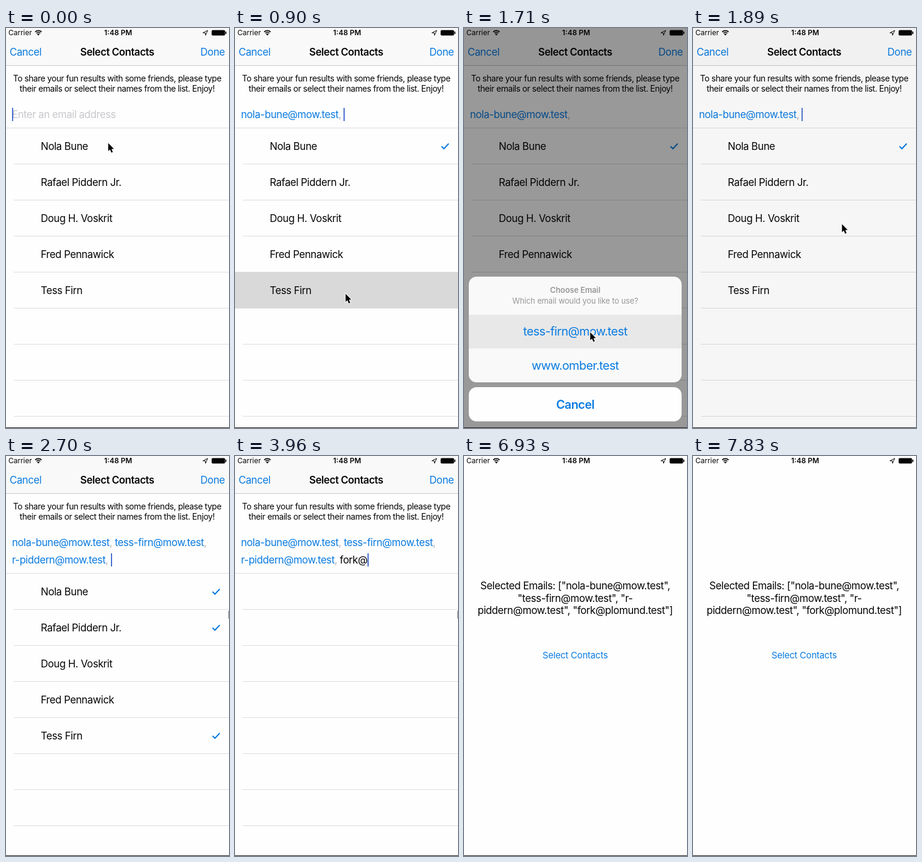
An HTML page with a canvas that plays this animation: 372 by 666 pixels, repeating every 7920 ms.

```html
<!DOCTYPE html>
<html lang="en">
<head>
<meta charset="utf-8">
<title>Select Contacts</title>
<style>
html, body { margin: 0; width: 372px; height: 666px; overflow: hidden; background: #fefefe; }
canvas { display: block; }
</style>
</head>
<body>
<canvas id="stage" width="372" height="666"></canvas>
<script>
const W = 372, H = 666, LOOP = 7920, STEP = 90, MID = 185.5;
const ctx = document.getElementById('stage').getContext('2d');
const PAPER = '#fefefe', BAR = '#f9f9f9', INK = '#050505', BLUE = '#0a7be0';
const LINE = '#dcdce4', PRESSED = '#d9d9d9';

// pressed: [from, to], checked: moment the tick appears
const contacts = [
  { name: 'Nola Bune', email: 'nola-bune@mow.test', pressed: [360, 450], checked: 450 },
  { name: 'Rafael Piddern Jr.', email: 'r-piddern@mow.test', pressed: [2160, 2250], checked: 2250 },
  { name: 'Doug H. Voskrit' },
  { name: 'Fred Pennawick' },
  { name: 'Tess Firn', email: 'tess-firn@mow.test', pressed: [900, 1300], checked: 1980 }
];
const [nola, rafael, , , tess] = contacts;
const TYPED = 'fork@plomund.test';
const TYPE_AT = 3060, COMMIT_AT = 5960, DONE_AT = 6440;

// pointer stops: time, x, y
const stops = [
  [0, 170, 191], [540, 170, 191], [860, 184, 442], [1200, 184, 442],
  [1560, 210, 506], [1730, 210, 506], [1890, 248, 326], [2070, 252, 262],
  [2340, 252, 262], [2700, 371, 257], [5900, 371, 257], [6300, 344, 42],
  [6600, 344, 42], [7100, 382, 60]
];

const clamp = v => Math.max(0, Math.min(1, v));
const ramp = (t, a, b) => clamp((t - a) / (b - a));
const smooth = x => x * x * (3 - 2 * x);
const mix = (a, b, p) => a + (b - a) * p;
const within = (t, span) => !!span && t >= span[0] && t < span[1];

function rect(x, y, w, h, color) {
  ctx.fillStyle = color;
  ctx.fillRect(x, y, w, h);
}

function text(str, x, y, size, { color = INK, align = 'left', weight = 400, gap = 0 } = {}) {
  ctx.font = `${weight} ${size}px Inter, "Liberation Sans", sans-serif`;
  ctx.letterSpacing = gap + 'px';
  ctx.textAlign = align;
  ctx.fillStyle = color;
  ctx.fillText(str, x, y + size * 0.36);
  return x + ctx.measureText(str).width;
}

function path(points, close) {
  ctx.beginPath();
  points.forEach(([x, y], i) => i ? ctx.lineTo(x, y) : ctx.moveTo(x, y));
  if (close) ctx.closePath();
}

function panel(x, y, w, h, color) {
  ctx.beginPath();
  ctx.roundRect(x, y, w, h, 13);
  ctx.fillStyle = color;
  ctx.fill();
}

function statusBar() {
  text('Carrier', 4, 8, 12);
  ctx.strokeStyle = ctx.fillStyle = INK;
  ctx.lineWidth = 1.7;
  for (const r of [4.6, 7.6]) {
    ctx.beginPath();
    ctx.arc(54, 12, r, -Math.PI * 0.75, -Math.PI * 0.25);
    ctx.stroke();
  }
  ctx.beginPath();
  ctx.moveTo(54, 12.5);
  ctx.arc(54, 12.5, 3, -Math.PI * 0.75, -Math.PI * 0.25);
  ctx.fill();
  text('1:48 PM', 187, 8, 12, { align: 'center', weight: 600 });
  path([[328.5, 8], [336.5, 4], [332.8, 12.2], [332.5, 8.2]], true);
  ctx.lineWidth = 1;
  ctx.stroke();
  ctx.beginPath();
  ctx.roundRect(343, 3.5, 22.5, 9, 2);
  ctx.fill();
  rect(366, 6, 1.5, 4, INK);
}

function tick(x, y) {
  path([[x, y], [x + 4, y + 4], [x + 12, y - 4.5]]);
  ctx.strokeStyle = BLUE;
  ctx.lineWidth = 2;
  ctx.stroke();
}

function caret(t, x, y, dim) {
  if (t % 900 >= 540) return;
  ctx.globalAlpha = 1 - 0.6 * dim;
  rect(Math.round(x), y - 11, 2, 22, '#4a70d0');
  ctx.globalAlpha = 1;
}

function field(t, dim) {
  const opt = { gap: -0.45 };
  const blue = { ...opt, color: BLUE }, grey = { ...opt, color: '#b4b4ba' };
  const entry = (str, x, y) => text(', ', text(str, x, y, 17, blue), y, 17, grey);
  if (t < nola.checked) {
    text('Enter an email address', 10, 144, 17, { ...opt, color: '#c8c8cd' });
    caret(t, 10, 144, dim);
    return;
  }
  let x = entry(nola.email, 10, 144), y = 144;
  if (t >= tess.checked) x = entry(tess.email, x, y);
  if (t >= rafael.checked) {
    y = 173;
    x = entry(rafael.email, 10, y);
  }
  if (t >= COMMIT_AT) {
    x = entry(TYPED, x, y);
  } else if (t >= TYPE_AT) {
    const count = t < 4050
      ? Math.min(5, 1 + Math.floor((t - TYPE_AT) / 200))
      : 5 + Math.floor((t - 4050) / 120);
    x = text(TYPED.slice(0, count), x, y, 17, opt);
  }
  caret(t, x, y, dim);
}

function list(t) {
  const top = t >= rafael.checked ? 195 : 166;
  const searching = t >= TYPE_AT && t < COMMIT_AT;
  rect(0, top, W, 1, LINE);
  for (let y = top + 60; y < H; y += 60) rect(searching ? 12 : 13, y, W, 1, LINE);
  if (searching) return;
  contacts.forEach((c, i) => {
    const y = top + 31 + i * 60;
    if (within(t, c.pressed)) rect(0, y - 31, W, 61, PRESSED);
    text(c.name, 58, y, 17, { gap: -0.42 });
    if (t >= c.checked) tick(344.5, y);
  });
}

function picker(t, dim) {
  const nav = { color: BLUE, gap: -0.42 };
  rect(0, 0, W, H, PAPER);
  rect(0, 0, W, 62, BAR);
  rect(0, 62, W, 1, '#c8c8cc');
  text('Cancel', 6, 40, 17, nav);
  text('Select Contacts', MID, 40, 17, { align: 'center', weight: 600, gap: -0.45 });
  ctx.globalAlpha = within(t, [6390, 6570]) ? 0.35 : 1;
  text('Done', 365, 40, 17, { ...nav, align: 'right' });
  ctx.globalAlpha = 1;
  const note = { align: 'center', gap: -0.43 };
  text('To share your fun results with some friends, please type', MID, 84, 14, note);
  text('their emails or select their names from the list. Enjoy!', MID, 101, 14, note);
  field(t, dim);
  list(t);
}

function sheet(t, drop) {
  const mid = { align: 'center' };
  const grey = { ...mid, color: '#98989a', gap: -0.12 };
  const link = { ...mid, color: BLUE, gap: -0.6 };
  ctx.save();
  ctx.translate(0, drop);
  panel(8, 414, 355, 176, '#f9f9f9');
  if (t >= 1640) rect(8, 477, 355, 56, '#e8e8e8');
  rect(8, 477, 355, 1, '#efeff1');
  rect(8, 533, 355, 1, '#efeff1');
  text('Choose Email', MID, 436, 13, { ...grey, weight: 600 });
  text('Which email would you like to use?', MID, 454, 13, grey);
  text(tess.email, MID, 505, 20, link);
  text('www.omber.test', MID, 562, 20, link);
  panel(8, 598, 355, 57, '#fefefe');
  text('Cancel', MID, 627, 20, { ...link, weight: 600 });
  ctx.restore();
}

function result() {
  const opt = { align: 'center', gap: -0.42 };
  rect(0, 0, W, H, PAPER);
  const [first, last] = rafael.email.split('-');
  text(`Selected Emails: ["${nola.email}",`, MID, 216, 17, opt);
  text(`"${tess.email}", "${first}-`, MID, 237, 17, opt);
  text(`${last}", "${TYPED}"]`, MID, 257, 17, opt);
  text('Select Contacts', MID, 332, 15, { align: 'center', color: BLUE, gap: -0.2 });
}

function pointer(t) {
  const i = stops.findIndex(s => s[0] > t);
  if (i < 0) return;
  const a = stops[i - 1], b = stops[i];
  const p = smooth(ramp(t, a[0], b[0]));
  ctx.save();
  ctx.translate(mix(a[1], b[1], p), mix(a[2], b[2], p));
  path([[0.5, 0.5], [0.5, 14], [3.5, 11.3], [5.8, 16.5], [8.2, 15.5], [6, 10.5], [10, 10.2]], true);
  ctx.strokeStyle = '#fff';
  ctx.lineWidth = 2;
  ctx.stroke();
  ctx.fillStyle = '#000';
  ctx.fill();
  ctx.restore();
}

function draw(t) {
  const up = 1 - (1 - ramp(t, 930, 1230)) ** 2;
  const dim = up * (1 - ramp(t, 1720, 1905));
  const slide = smooth(ramp(t, DONE_AT, DONE_AT + 450)) * H;

  if (slide > 0) result();
  if (slide < H) {
    ctx.save();
    ctx.translate(0, slide);
    picker(t, dim);
    ctx.restore();
  }
  statusBar();

  if (dim > 0) {
    rect(0, 0, W, H, `rgba(0,0,0,${0.4 * dim})`);
    sheet(t, 252 * (1 - up + ramp(t, 1720, 1880)));
  }
  rect(0, 665, W, 1, '#202020');
  pointer(t);
}

const start = performance.now();
function animate(now) {
  const t = Math.max(0, now - start) % LOOP;
  draw(Math.floor((t + 4) / STEP) * STEP % LOOP);
  requestAnimationFrame(animate);
}
draw(0);
requestAnimationFrame(animate);
</script>
</body>
</html>
```
